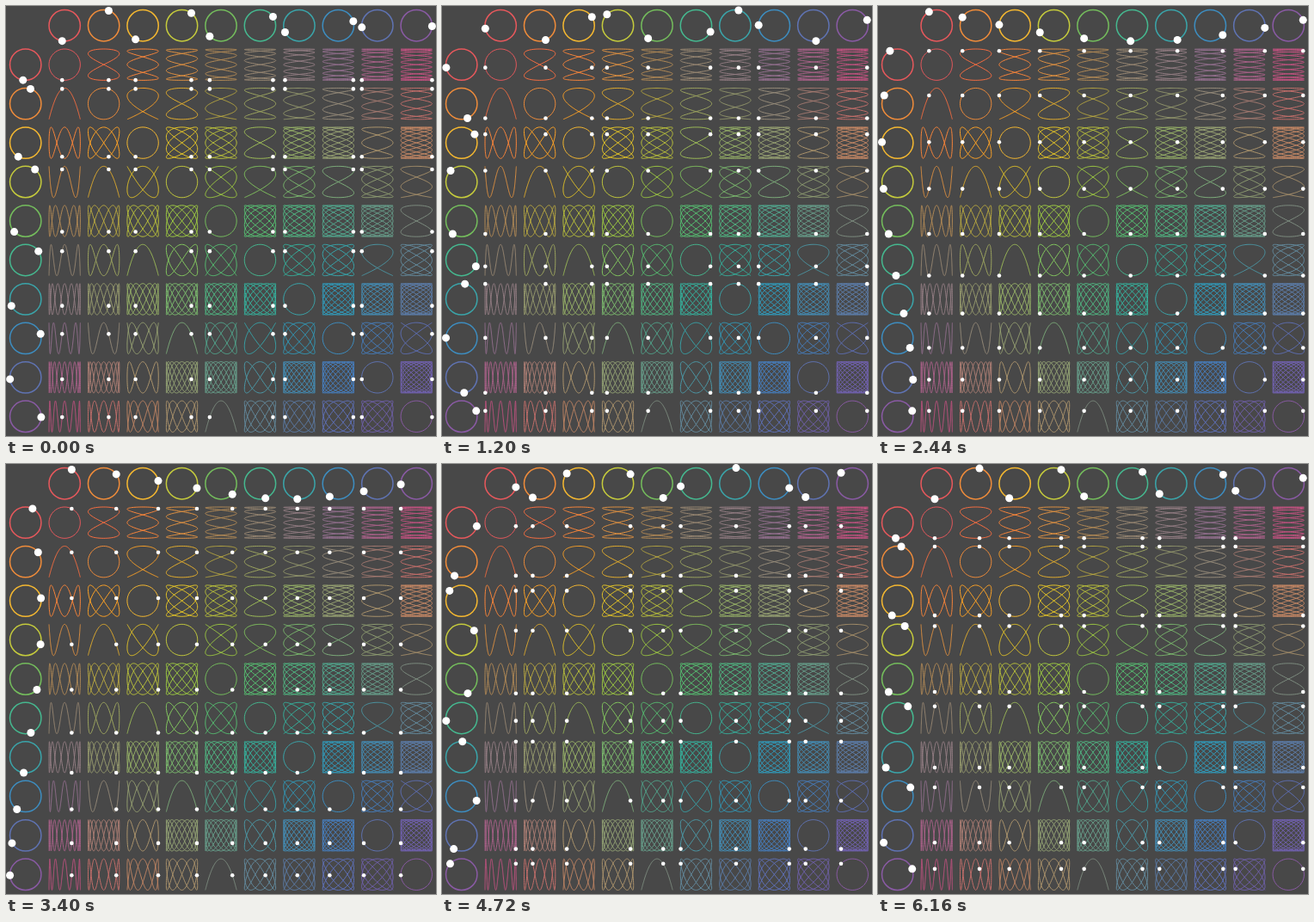
An HTML page with a canvas that plays this animation: 500x500 px, repeating every 6.2 s.

```html
<!DOCTYPE html>
<html lang="en">
<head>
<meta charset="utf-8">
<title>Lissajous table</title>
<style>
html, body { margin: 0; width: 100%; height: 100%; overflow: hidden; background: #484848; }
canvas { display: block; }
</style>
</head>
<body>
<canvas id="stage" width="500" height="500"></canvas>
<script>
const LOOP = 6200, START = 189.2 / 360, TAU = 2 * Math.PI;
const COUNT = 10, CELL = 500 / (COUNT + 1), RADIUS = CELL * 0.4;
const COLORS = '#e8585c #f08c3a #f5b830 #c5cb3c #74bd5c #45b88f #3aa5aa #3d8dc0 #5f73b3 #8a5aa5'
  .split(' ').map(hex => [1, 3, 5].map(k => parseInt(hex.slice(k, k + 2), 16)));

const ctx = document.getElementById('stage').getContext('2d');
const center = i => (i + 0.5) * CELL;
// Position of the point turning n times per loop, in the given row or column
const px = (col, phi, n) => center(col) + RADIUS * Math.sin(n * phi);
const py = (row, phi, n) => center(row) - RADIUS * Math.cos(n * phi);
const gcd = (a, b) => b ? gcd(b, a % b) : a;

// Average of two colours, with some of the lost saturation restored
function mix(a, b) {
  const mean = a.map((v, k) => (v + b[k]) / 2);
  const gray = (mean[0] + mean[1] + mean[2]) / 3;
  const boost = a === b ? 1 : 1.15;
  return `rgb(${mean.map(v => Math.round(gray + (v - gray) * boost))})`;
}

function disc(g, x, y, r) {
  g.beginPath();
  g.arc(x, y, r, 0, TAU);
}

// Traces each curve just once: an even row ratio runs back along itself
function curve(g, row, col) {
  const d = gcd(row, col), p = col / d, q = row / d;
  const span = q % 2 ? TAU : TAU / 2, steps = 60 * Math.max(p, q);
  g.beginPath();
  for (let k = 0; k <= steps; k++) {
    const phi = TAU / 4 + span * k / steps;
    g.lineTo(px(col, phi, p), py(row, phi, q));
  }
  g.stroke();
}

function drawTable() {
  const layer = document.createElement('canvas');
  layer.width = layer.height = 500;
  const g = layer.getContext('2d');
  g.fillStyle = '#484848';
  g.fillRect(0, 0, 500, 500);
  COLORS.forEach((color, k) => {
    const row = k + 1;
    g.lineWidth = 1.5;
    g.strokeStyle = mix(color, color);
    disc(g, center(row), center(0), RADIUS);
    g.stroke();
    disc(g, center(0), center(row), RADIUS);
    g.stroke();
    g.lineWidth = 1;
    COLORS.forEach((other, j) => {
      g.strokeStyle = mix(color, other);
      curve(g, row, j + 1);
    });
  });
  return layer;
}

const table = drawTable();

function dot(x, y, r) {
  disc(ctx, x, y, r);
  ctx.fill();
}

function draw() {
  const phi = TAU * (START + performance.now() % LOOP / LOOP);
  ctx.drawImage(table, 0, 0);
  ctx.fillStyle = '#fff';
  for (let i = 1; i <= COUNT; i++) {
    const x = px(i, phi, i);
    dot(x, py(0, phi, i), 4.5);
    dot(px(0, phi, i), py(i, phi, i), 4.5);
    for (let j = 1; j <= COUNT; j++) dot(x, py(j, phi, j), 2.3);
  }
  requestAnimationFrame(draw);
}
draw();
</script>
</body>
</html>
```
